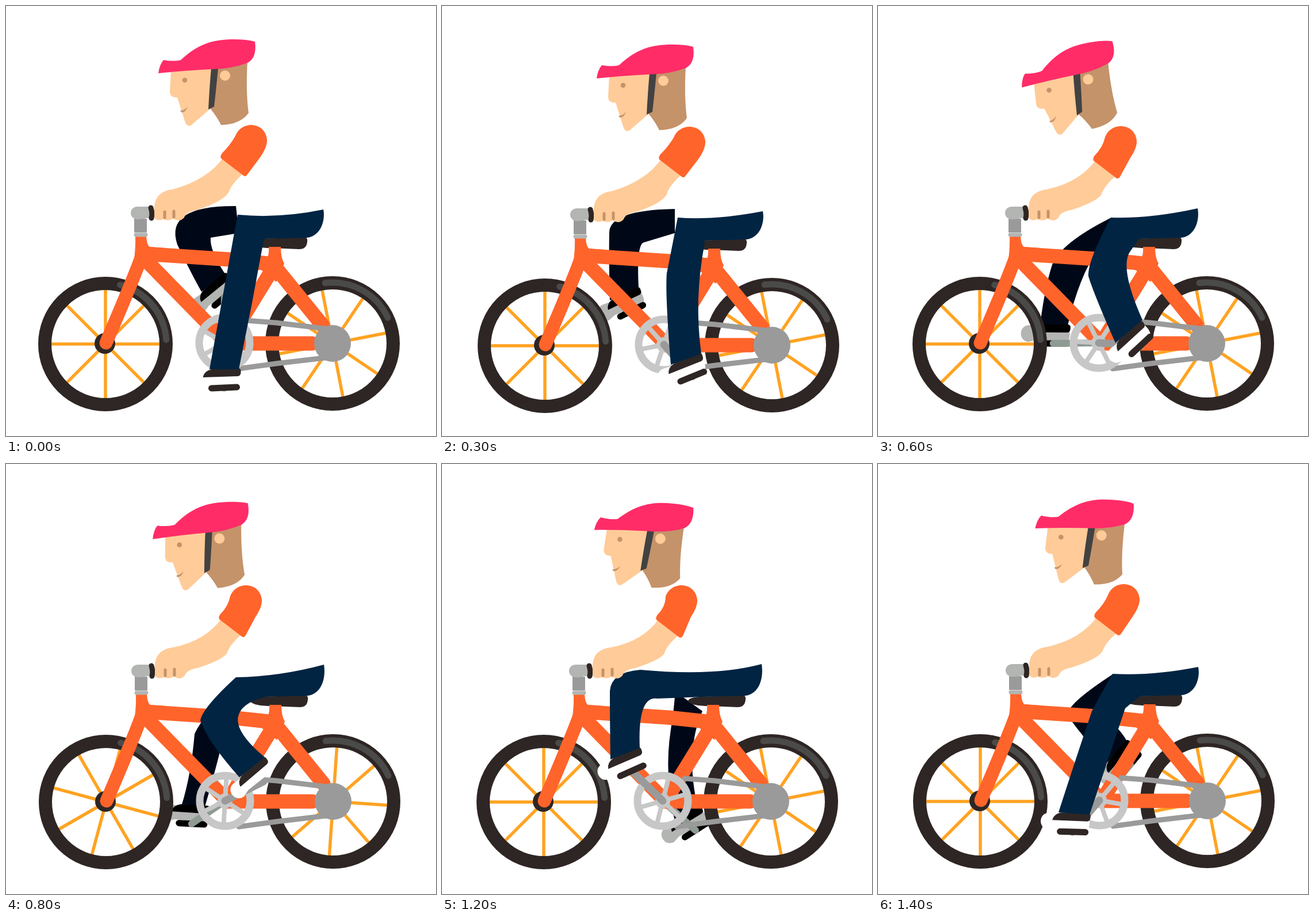
These frames come from a looping animation (748 by 748 pixels, 1.5 s). An HTML page with a canvas:

```html
<!DOCTYPE html>
<html lang="en">
<head>
<meta charset="utf-8">
<title>Cyclist</title>
<style>
  html, body { margin: 0; width: 100%; height: 100%; overflow: hidden; background: #fff; }
  canvas { display: block; width: 748px; height: 748px; }
</style>
</head>
<body>
<canvas id="stage" width="748" height="748"></canvas>
<script>
const ctx = document.getElementById('stage').getContext('2d');

const STEP = 100, STEPS = 15;
const KEYS = [0, 3, 6, 8, 10, 12, 14];
const ORANGE = '#ff642b', DARK = '#2e2624', GREY = '#9a9a9a', SILVER = '#b2b5b2',
      SKIN = '#ffcb98', BROWN = '#c4936a', NAVY = '#002442', NIGHT = '#000818',
      PINK = '#ff2c68', AMBER = '#ffa322';

// Leg outline per key: inner thigh, inner knee, heel, toe side, shin, knee, knee corner, thigh top
const NEAR = [
  [448,409, 428,520, 405,632, 354,632, 378,500, 397,395, 401,375, 403,363],
  [457,412, 438,510, 451,605, 398,624, 388,500, 391,465, 400,420, 410,368],
  [440,425, 418,452, 460,546, 413,586, 375,500, 366,470, 364,445, 405,368],
  [430,412, 368,442, 450,510, 406,545, 350,482, 338,446, 342,424, 400,371],
  [385,411, 354,411, 403,465, 360,505, 325,450, 304,410, 289,364, 350,358],
  [375,408, 340,402, 344,494, 293,514, 292,450, 292,395, 294,362, 345,358],
  [430,425, 405,500, 368,610, 314,606, 345,510, 372,430, 385,405, 408,365]
];
const FAR = [
  [356,403, 354,425, 381,466, 340,497, 322,465, 298,415, 275,347, 400,348],
  [352,411, 338,412, 342,490, 292,512, 290,440, 291,395, 290,355, 405,353],
  [382,425, 350,470, 330,556, 282,554, 290,490, 303,450, 318,412, 406,368],
  [390,420, 372,510, 346,596, 306,592, 322,540, 328,470, 336,448, 400,375],
  [442,435, 440,500, 393,628, 345,630, 365,560, 395,440, 397,405, 405,390],
  [453,430, 422,500, 445,598, 405,621, 386,540, 398,462, 403,430, 405,405],
  [385,440, 415,450, 433,482, 398,520, 360,480, 330,438, 325,420, 408,366]
];
// Bike x y, head x y turn, shoulder x y, cuff x y, hip y
const BODY = [
  [0,0,  0,0,0,       0,0,   0,0,  0],
  [6,3,  4,9,0,       4,3,   4,2,  0],
  [4,0,  -20,12,-9,   -4,2,  1,4,  -2],
  [1,0,  -11,10,-2.5, -9,4,  -3,5, -5],
  [4,0,  -7,8,2.2,    -11,5, -2,7, -6],
  [4,0,  2,6,5.6,     -10,4, -1,6, -6],
  [5,-1, 10,1,4,      1,2,   3,2,  0]
];
const SPIN = [0, -45, -90, -120, -165, -180, -225, -225];

function locate(n) {
  let i = KEYS.length - 1;
  while (KEYS[i] > n) i--;
  const end = i + 1 < KEYS.length ? KEYS[i + 1] : STEPS;
  return [i, (n - KEYS[i]) / (end - KEYS[i])];
}

// Closed Catmull-Rom through the rows
function blend(rows, i, u) {
  const k = rows.length;
  const [a, b, c, d] = [-1, 0, 1, 2].map(o => rows[(i + o + k) % k]);
  return b.map((p, j) => p + 0.5 * u * (c[j] - a[j] +
    u * (2 * a[j] - 5 * p + 4 * c[j] - d[j] + u * (3 * (p - c[j]) + d[j] - a[j]))));
}

function fill(d, color) {
  ctx.fillStyle = color;
  ctx.fill(new Path2D(d));
}

function line(d, color, width, cap = 'round') {
  ctx.strokeStyle = color;
  ctx.lineWidth = width;
  ctx.lineCap = cap;
  ctx.lineJoin = 'round';
  ctx.stroke(new Path2D(d));
}

function disc(x, y, r, color) {
  ctx.fillStyle = color;
  ctx.beginPath();
  ctx.arc(x, y, r, 0, 7);
  ctx.fill();
}

function arc(x, y, r, from, to, color, width) {
  ctx.strokeStyle = color;
  ctx.lineWidth = width;
  ctx.lineCap = 'round';
  ctx.beginPath();
  ctx.arc(x, y, r, from * Math.PI / 180, to * Math.PI / 180);
  ctx.stroke();
}

function at(x, y, angle, draw) {
  ctx.save();
  ctx.translate(x, y);
  ctx.rotate(angle);
  draw();
  ctx.restore();
}

function spokes(x, y, angle, count, length, color, width) {
  for (let i = 0; i < count; i++) {
    at(x, y, angle + i * 2 * Math.PI / count, () => line(`M0 0H${length}`, color, width, 'butt'));
  }
}

function wheel(x, y, angle, glow) {
  spokes(x, y, angle * Math.PI / 180, 8, 97, AMBER, 5.5);
  arc(x, y, 105.5, 0, 360, DARK, 23);
  arc(x, y, 106, glow, glow + 72, '#4a4a48', 11);
}

// Ankle centre, foot angle and pedal centre
function foot(p) {
  const x = (p[4] + p[6]) / 2, y = (p[5] + p[7]) / 2;
  const a = Math.atan2(p[5] - p[7], p[4] - p[6]);
  return { x, y, a, px: x - 32 * Math.sin(a), py: y + 32 * Math.cos(a) };
}

function shoe(f, top, body, bar) {
  at(f.x, f.y, f.a, () => {
    fill('M-40 2C-62 0-62 31-42 31L-30 27H26Q30 18 27 6Z', body);
    fill('M-37 14Q-35 3-22 0L25-2Q30-1 29 5Q29 11 24 12Z', top);
    if (bar) line('M-22 33L22 31', top, 11);
  });
}

const limb = p => `L${p[0]} ${p[1]}Q${p.slice(2, 6)} L${p[6]} ${p[7]}Q${p.slice(8, 12)} Q${p.slice(12, 16)}`;

function bikeFrame() {
  line('M240 431L390 441L465 449', ORANGE, 25);
  line('M247 446L381 583', ORANGE, 25);
  line('M467 452L386 584', ORANGE, 25);
  line('M469 455L551 556', ORANGE, 25);
  line('M381 587L532 587', ORANGE, 25);
  line('M237 432Q228 460 174 586', ORANGE, 23);
  fill('M225 401H244Q245 416 250 419L278 421L272 445H244L218 472Q226 430 225 401Z', ORANGE);
  fill('M457 419H478Q478 438 484 448L470 480L440 456Q459 444 457 419Z', ORANGE);
}

function handlebar() {
  line('M234 370V394', GREY, 22, 'butt');
  line('M226 398H243', SILVER, 7);
  fill('M229 349H249V369H243Q238 371 229 371C213 371 213 349 229 349Z', SILVER);
  line('M252 351Q255 360 253 369', DARK, 9);
}

function head(dx, dy, turn) {
  at(349 + dx, 90 + dy, turn * Math.PI / 180, () => {
    ctx.translate(-349, -90);
    fill('M287 110L285 150Q286 160 298 159L312 203Q317 213 325 205L355 179L362 105Z', SKIN);
    fill('M360 106L420 96Q417 150 422 186Q408 206 374 207Q368 194 355 178Z', BROWN);
    fill('M357 108H369Q365 150 362 175L352 180Q354 140 357 108Z', '#424242');
    disc(381, 121, 9, SKIN);
    disc(311, 129, 4.3, BROWN);
    fill('M303 182Q311 182 316 175Q313 185 305 185Z', BROWN);
    fill('M265 117Q267 102 274 94Q292 97 304 94C334 66 360 58 396 58Q420 58 433 62Q437 90 420 99Q390 110 357 110Q312 112 265 117Z', PINK);
  });
}

function arm(bx, by, sx, sy, cx, cy) {
  const hand = (x, y) => `${x + bx} ${y + by} `;
  const top = (x, y) => `${x + sx} ${y + sy} `;
  const cuff = (x, y) => `${x + cx} ${y + cy} `;
  fill(`M${cuff(379, 262)}Q${cuff(352, 302)}${hand(290, 319)}Q${hand(261, 322)}${hand(258, 348)}` +
    `V${368 + by}Q${hand(262, 375)}${hand(274, 371)}Q${hand(282, 375)}${hand(291, 370)}` +
    `Q${hand(302, 377)}${hand(310, 368)}Q${hand(313, 358)}${hand(332, 355)}` +
    `Q${hand(384, 338)}${cuff(389, 320)}Q${cuff(394, 308)}${cuff(412, 292)}Z`, SKIN);
  line(`M${hand(276, 358)}V${368 + by}M${hand(292, 357)}V${367 + by}`, BROWN, 5);
  fill(`M${cuff(374, 265)}Q${cuff(372, 261)}${cuff(376, 256)}Q${cuff(390, 242)}${top(399, 226)}` +
    `C${top(410, 198)}${top(451, 202)}${top(454, 232)}Q${top(455, 244)}${top(443, 262)}` +
    `L${cuff(420, 293)}Q${cuff(417, 298)}${cuff(413, 295)}Z`, ORANGE);
}

function draw(n) {
  const [i, u] = locate(n);
  const near = blend(NEAR, i, u), far = blend(FAR, i, u);
  const [bx, by, hx, hy, turn, sx, sy, cx, cy, hip] = blend(BODY, i, u);
  const spin = SPIN[i] + (SPIN[i + 1] - SPIN[i]) * u;
  const nf = foot(near), ff = foot(far);
  const ox = 380 + bx, oy = 586 + by;

  ctx.fillStyle = '#fff';
  ctx.fillRect(0, 0, 748, 748);

  fill(`M405 395${limb(far)}Z`, NIGHT);
  shoe(ff, '#000', SILVER, true);
  line(`M${ox} ${oy}L${ff.px} ${ff.py}`, '#8f9a92', 12);

  ctx.save();
  ctx.translate(bx, by);
  wheel(173, 588, spin, -76);
  wheel(568, 587, spin + 34, -97);
  disc(172, 587, 18, DARK);
  fill('M424 413Q424 406 445 405L519 402Q525 402 524 410Q523 423 510 423L462 421Q430 421 424 413Z', DARK);
  bikeFrame();
  line('M418 547L470 551L562 562M404 631L470 622L555 612', GREY, 9);
  disc(568, 587, 32, GREY);
  handlebar();
  ctx.restore();

  const crank = Math.atan2(nf.py - oy, nf.px - ox);
  spokes(ox, oy, crank, 6, 42, '#c6c7c6', 8);
  arc(ox, oy, 44, 0, 360, '#c6c7c6', 13);
  disc(ox, oy, 13, '#c6c7c6');
  line(`M${ox} ${oy}L${nf.px} ${nf.py}`, GREY, 13);

  shoe(nf, DARK, '#fff', n < 7 || n > 11);
  const back = `${552 + bx} ${354 + by + hip}`;
  fill(`M${back}C${556 + bx} ${372 + by} ${548 + bx} ${400 + by} ${524 + bx} ${403 + by}` +
    `L${450 + bx} ${405 + by}${limb(near)}Q475 ${370 + by} ${back}Z`, NAVY);

  head(hx, hy, turn);
  arm(bx, by, sx, sy, cx, cy);
}

const start = performance.now();
function tick() {
  draw(Math.floor((performance.now() - start) / STEP) % STEPS);
  requestAnimationFrame(tick);
}
tick();
</script>
</body>
</html>
```
